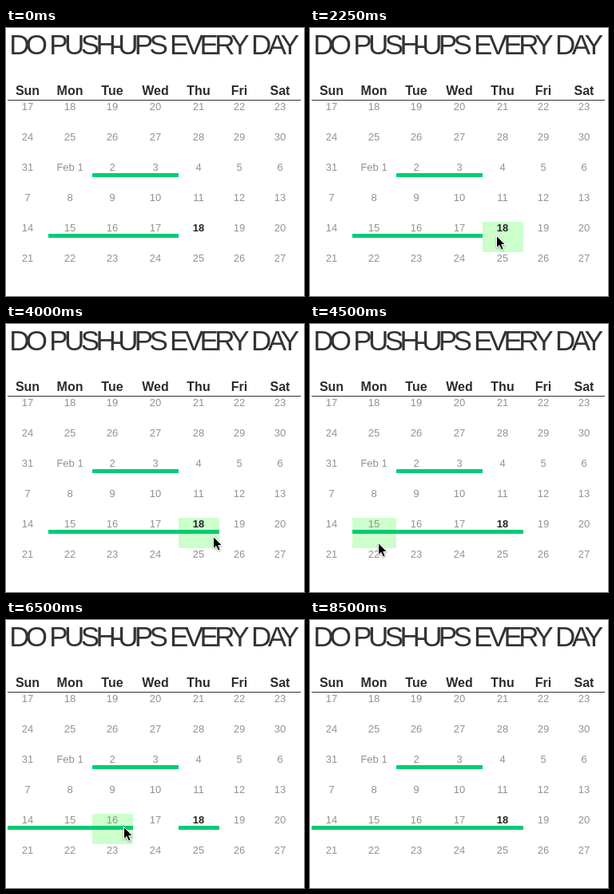
These frames come from a looping animation (373x336 px, 9000 ms). An HTML page:

```html
<!DOCTYPE html>
<html lang="en">
<head>
<meta charset="utf-8">
<title>Push-up calendar</title>
<style>
  html, body { margin: 0; width: 100%; height: 100%; overflow: hidden; background: #fff; }
  svg { display: block; width: 373px; height: 336px; font-family: "Liberation Sans", Arial, sans-serif; }
  .title { font-size: 35px; letter-spacing: -4.6px; fill: #333; }
  .head, .day { text-anchor: middle; }
  .head { font-size: 16px; font-weight: bold; fill: #2b2b2b; }
  .day { font-size: 13px; fill: #929292; }
  .today { font-weight: bold; fill: #222; }
  .bar { fill: #00cb76; }
  #pointer { filter: drop-shadow(0 1px 1px rgba(0, 0, 0, .35)); }
</style>
</head>
<body>
<svg id="stage" viewBox="0 0 373 336">
  <rect id="hover" y="243" height="38" fill="#ccffcc"/>
  <text class="title" y="33"><tspan x="4.2">DO</tspan><tspan x="54.3">PUSH-UPS</tspan><tspan x="205">EVERY</tspan><tspan x="307">DAY</tspan></text>
  <rect x="2" y="90" width="367" height="1" fill="#333"/>
  <g id="grid"></g>
  <path id="pointer" d="M0 0V15.2L3.5 12L6 17.6L8.7 16.4L6.3 11H11Z" fill="#000" stroke="#fff"/>
</svg>
<script>
const LOOP = 9000, STEP = 250, ROW = 38, TOP = 91, WEEK = 4;
const edges = [2, 53, 108, 159, 216, 267, 318, 369];
const centers = [27, 80, 133, 187, 241, 292, 343];
const byId = id => document.getElementById(id);
const grid = byId('grid'), hover = byId('hover'), pointer = byId('pointer');

function add(tag, attrs, text = '') {
  const el = document.createElementNS('http://www.w3.org/2000/svg', tag);
  for (const key in attrs) el.setAttribute(key, attrs[key]);
  el.textContent = text;
  return grid.appendChild(el);
}

const addBar = (col, row) => add('rect', {
  class: 'bar', x: edges[col], y: TOP + row * ROW + 15,
  width: edges[col + 1] - edges[col], height: 5
});

['Sun', 'Mon', 'Tue', 'Wed', 'Thu', 'Fri', 'Sat'].forEach((name, col) =>
  add('text', { class: 'head', x: centers[col], y: 84 }, name));

for (let i = 0; i < 42; i++) {
  const n = 17 + i, date = n > 31 ? n - 31 : n;
  add('text', {
    class: n === 49 ? 'day today' : 'day',
    x: centers[i % 7], y: TOP + Math.floor(i / 7) * ROW + 12
  }, n === 32 ? 'Feb 1' : date);
}

addBar(2, 2);
addBar(3, 2);
const bars = [0, 1, 2, 3, 4].map(col => addBar(col, WEEK));

// Pointer x, y and hovered column, one pose per step from START
const START = 1250;
const poses = [
  [221, 263], [238, 262], [233, 260], [233, 260],
  [233, 260, 4], [150, 260, 2], [236, 262, 4], [356, 265], [304, 266],
  [288, 266], [270, 266], [259, 266, 4], [170, 270, 3], [85, 274, 1],
  [28, 278, 0], [32, 277, 0], [40, 275, 0], [102, 268, 1], [178, 263, 3],
  [180, 262, 3], [164, 260, 3], [147, 259, 2], [147, 259, 2], [174, 259, 3],
  [151, 258, 3], [149, 262, 2], [17, 274], [200, 8], [356, 83]
];

// Clicks flip a day: time, column
const clicks = [[2750, 4], [5000, 0], [6000, 3], [6750, 2], [7000, 3], [7500, 2]];

function draw(now) {
  const t = now % LOOP;
  const pose = poses[Math.floor((t - START) / STEP)];
  const [x, y, col] = pose || [];
  pointer.style.display = pose ? '' : 'none';
  if (pose) pointer.setAttribute('transform', `translate(${x + .5} ${y + .5})`);

  hover.setAttribute('x', edges[col] || 0);
  hover.setAttribute('width', col === undefined ? 0 : edges[col + 1] - edges[col]);

  const marked = [false, true, true, true, false];
  for (const [time, day] of clicks) if (t >= time) marked[day] = !marked[day];
  bars.forEach((bar, i) => bar.style.display = marked[i] ? '' : 'none');
}

const began = performance.now();
function tick() {
  draw(performance.now() - began);
  requestAnimationFrame(tick);
}
tick();
</script>
</body>
</html>
```
